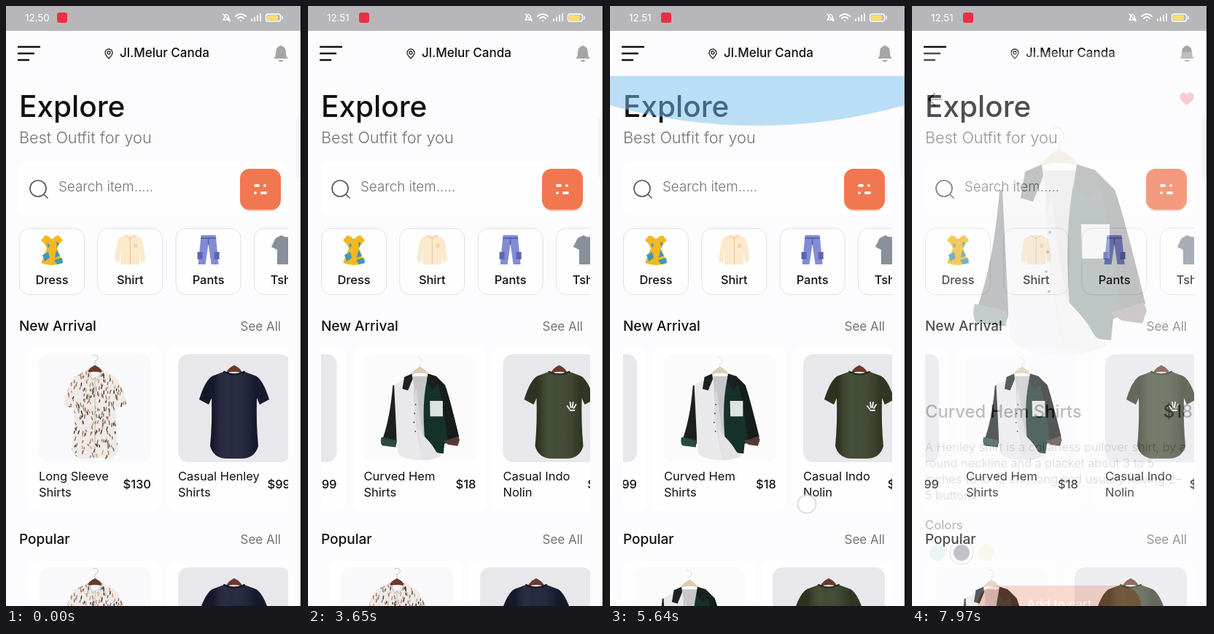
An HTML page for the animation above (8 s loop, 406 by 822 pixels).

```html
<!DOCTYPE html>
<html lang="en">
<head>
<meta charset="utf-8">
<title>Outfit shop</title>
<style>
html, body { margin: 0; width: 100%; height: 100%; overflow: hidden; background: #fcfcfe; }
svg { display: block; width: 100vw; height: 100vh; }
text { font-family: Inter, "Open Sans", sans-serif; fill: #111114; }
.medium { font-weight: 500; }
.light { font-weight: 300; }
.soft { fill: #737378; }
.end { text-anchor: end; }
.mid { text-anchor: middle; }
.line { fill: none; stroke-linecap: round; stroke-linejoin: round; }

.anim { animation: 8s linear infinite; }
#before { animation-name: hide; }
#after { animation-name: show; }
#page { animation-name: page; }
#cats { animation-name: cats; }
#arrivals { animation-name: arrivals; }
#popular { animation-name: popular; }
#glow { animation-name: glow; transform-origin: 202px 96px; }
#detail { animation-name: detail; }

@keyframes hide { 0% { opacity: 1; animation-timing-function: step-end; } 6.25%, 100% { opacity: 0; } }
@keyframes show { 0% { opacity: 0; animation-timing-function: step-end; } 6.25%, 100% { opacity: 1; } }
@keyframes cats {
  0%, 13.5% { transform: none; }
  14.25% { transform: translateX(-11px); animation-timing-function: ease-out; }
  15.75%, 22.5% { transform: translateX(-42px); animation-timing-function: ease-out; }
  25%, 100% { transform: none; }
}
@keyframes arrivals {
  0%, 37% { transform: none; animation-timing-function: ease-out; }
  40%, 42% { transform: translateX(-175px); animation-timing-function: ease-out; }
  46%, 100% { transform: translateX(-353px); }
}
@keyframes page {
  0%, 48% { transform: none; animation-timing-function: ease-out; }
  52%, 65.25% { transform: translateY(-174px); animation-timing-function: ease-out; }
  68.5%, 100% { transform: none; }
}
@keyframes popular {
  0%, 55.25% { transform: none; }
  56.75% { transform: translateX(-85px); }
  58.5% { transform: translateX(-200px); animation-timing-function: ease-out; }
  63%, 100% { transform: translateX(-395px); }
}
@keyframes glow {
  0%, 68.5% { transform: scaleY(.2); opacity: 0; animation-timing-function: ease-out; }
  70.5%, 71.25% { transform: none; opacity: .5; }
  73.75%, 100% { transform: scaleY(.3); opacity: 0; }
}
/* The page fades upwards on entry and drops back on exit. */
@keyframes detail {
  0% { visibility: hidden; opacity: 0; transform: translateY(205px); }
  77.5% { visibility: visible; opacity: 0; transform: translateY(205px); animation-timing-function: cubic-bezier(.4, 0, .2, 1); }
  80.6% { opacity: .8; transform: translateY(2px); }
  81.25%, 97.54% { opacity: 1; transform: none; }
  98.38% { opacity: .655; transform: translateY(9px); }
  99% { opacity: .445; transform: translateY(25px); }
  99.63% { opacity: .27; transform: translateY(62px); }
  100% { visibility: visible; opacity: .16; transform: translateY(106px); }
}
</style>
</head>
<body>
<svg viewBox="0 0 406 822" preserveAspectRatio="none" id="stage">
  <defs>
    <clipPath id="body"><rect y="96" width="404" height="726"/></clipPath>
    <clipPath id="list"><rect x="18" y="-20" width="369" height="300"/></clipPath>
    <path id="tee" d="M-14 24Q0 31 14 24L30 30Q40 36 48 62L35 69L31 60Q30 95 33 126Q28 143 10 143H-10Q-28 143 -33 126Q-30 95 -31 60L-35 69L-48 62Q-40 36 -30 30Z"/>
    <path id="blouse" d="M-11 22L0 32L11 22L28 31Q36 40 43 68Q37 74 29 73Q27 100 32 130Q27 145 12 143Q0 140 -12 143Q-27 145 -32 130Q-27 100 -29 73Q-37 74 -43 68Q-36 40 -28 31Z"/>
    <clipPath id="blouseClip"><use href="#blouse"/></clipPath>
    <clipPath id="catList"><rect x="18" y="300" width="369" height="100"/></clipPath>
    <linearGradient id="fold">
      <stop offset=".2" stop-color="#000" stop-opacity=".22"/>
      <stop offset=".45" stop-color="#fff" stop-opacity=".05"/>
      <stop offset=".8" stop-color="#000" stop-opacity=".18"/>
    </linearGradient>
    <path id="hanger" d="M-11 26Q-10 20 0 15Q10 20 11 26Q0 22 -11 26Z" fill="#6b3a2c"/>
    <g id="print">
      <path d="M0 15V9q5-1 4-5t-7-2" class="line" stroke="#c9c4bc" stroke-width="1"/>
      <use href="#hanger"/>
      <use href="#blouse" fill="#efeae5"/>
      <g id="specks" clip-path="url(#blouseClip)"></g>
      <path d="M-11 22L-3 36L0 32V141M11 22L3 36L0 32" class="line" stroke="#b5ada4" stroke-width=".8"/>
    </g>
    <g id="dark">
      <use href="#hanger"/>
      <use href="#tee" fill="#1b1f36"/><use href="#tee" fill="url(#fold)"/>
      <path d="M-14 24Q0 31 14 24" class="line" stroke="#0f1122" stroke-width="2"/>
    </g>
    <g id="olive">
      <use href="#hanger"/>
      <use href="#tee" fill="#39432a"/><use href="#tee" fill="url(#fold)"/>
      <path d="M-14 24Q0 31 14 24" class="line" stroke="#222a18" stroke-width="2"/>
      <path d="M14 75l-3-4M16 73l-1-7M18 73l1-7M20 74l3-5M15 77h6" class="line" stroke="#f4f4f4" stroke-width="1.8"/>
    </g>
    <g id="duo">
      <path d="M0 32V21q8 1 6-10T-8 2" class="line" stroke="#e4e0d4" stroke-width="2"/>
      <path d="M-27 54Q-18 40 0 31Q18 40 27 54Q0 46 -27 54Z" fill="#dccdb0"/>
      <path d="M-22 60H24L14 285H-10Z" fill="#c6c6cb"/>
      <path d="M-82 88Q-75 84 -68 98L-70 260L-74 270L-116 258Q-90 190 -82 88Z" fill="#1b201f"/>
      <path d="M-116 243L-72 253L-73 274L-114 269Q-121 258 -116 243Z" fill="#2c4a40"/>
      <path d="M-78 86L-48 70L-24 57Q-14 90 -20 150Q-8 220 8 312Q-30 315 -58 300L-67 290L-70 250Z" fill="#e9e9eb"/>
      <path d="M-10 95Q-2 190 12 240L30 312H8Q-18 200 -18 120Z" fill="#d9d9dd"/>
      <path d="M-24 52L-47 62L-53 98L-36 103L-22 68Z" fill="#1d2221"/>
      <path d="M25 52L51 62L76 87Q88 120 118 243L74 264L71 293L50 291Q42 270 14 242Q6 140 21 72Z" fill="#16302a"/>
      <path d="M51 62L76 87Q88 120 118 243L84 260Q78 180 51 62Z" fill="#171c1c"/>
      <path d="M24 52L50 60L56 84L38 100L21 74Z" fill="#1a201f"/>
      <path d="M70 256L116 241L120 252L114 270L86 266Z" fill="#553a34"/>
      <path d="M30 134H69V181H31Z" fill="#dfe3e0"/>
      <path d="M8 312Q30 316 66 300L50 288L14 242L-8 215Z" fill="#e3e3e6"/>
      <path d="M-13 145v.1M-16 172v.1M-18 199v.1M-14 226v.1" class="line" stroke="#3c3c40" stroke-width="4"/>
    </g>
    <use id="smallDuo" href="#duo" transform="translate(0 3) scale(.4545)"/>

    <g id="dress">
      <path d="M-9-20L-4-18Q0-12 4-18L9-20L15-13L10-8L7-2L15 18Q0 24 -15 18L-7-2L-10-8L-15-13Z" fill="#f3b822"/>
      <path d="M-13 7l8-4 2 8-7 5zM6 0l5 8-7 3zM3 14l11-3 1 7-8 2zM-7-9l4 2-2 5zM6-11l4 2-3 6z" fill="#3f97b8"/>
    </g>
    <g id="shirt">
      <path d="M-7-20H7L15-16Q19-8 21 15L15 18L13 2V20H-13V2L-15 18L-21 15Q-19-8 -15-16Z" fill="#fbe9cc"/>
      <path d="M0-17V20M-7-20L0-15L7-20" class="line" stroke="#e8c49a" stroke-width="1"/>
      <path d="M5-8h5v5H5z" fill="#f5d0b0"/>
    </g>
    <g id="pants">
      <path d="M-10-20H10L14 20H4L0-8L-4 20H-14Z" fill="#828cd6"/>
      <path d="M-15 3h7v10h-7zM8 3h7v10H8z" fill="#5a65b4"/>
      <path d="M-10-16H10M0-16V-8" class="line" stroke="#4f59a6" stroke-width="1.5"/>
    </g>
    <path id="tshirt" d="M-7-20Q0-15 7-20L15-16L21-4L13 0V20H-13V0L-21-4L-15-16Z" fill="#89909c"/>
    <path id="heart" d="M0 9Q-14-1 -8-7Q-3-11 0-5Q3-11 8-7Q14-1 0 9Z" fill="#ef4a5c"/>
  </defs>

  <rect width="406" height="822" fill="#fcfcfe"/>

  <g clip-path="url(#body)">
    <g id="page" class="anim">
      <text x="18" y="152" font-size="40.5" class="medium">Explore</text>
      <text x="18" y="188" font-size="21.7" class="light soft">Best Outfit for you</text>
      <rect x="18" y="213" width="369" height="74" rx="10" fill="#fefefe"/>
      <path d="M55 250a11 11 0 1 1-22 0a11 11 0 1 1 22 0M52 258l5 5" class="line" stroke="#5a5a5e" stroke-width="1.7"/>
      <text x="72" y="254" font-size="18.8" class="light soft">Search item.....</text>
      <rect x="322" y="227" width="54" height="54" rx="13" fill="#f0cdc0"/>
      <rect x="321" y="223" width="56" height="56" rx="13" fill="#f17750"/>
      <path d="M342 246h4M355 246v.1M342 256v.1M351 256h5" class="line" stroke="#fff4ee" stroke-width="4"/>

      <g clip-path="url(#catList)"><g id="cats" class="anim"></g></g>
      <g id="sections"></g>
    </g>
    <path id="glow" class="anim" d="M0 96H404V136Q202 192 0 136Z" fill="#78c0ee"/>
  </g>

  <g id="header">
    <path d="M17 56H46M17 65H38M17 74H31" class="line" stroke="#111114" stroke-width="2.4"/>
    <path d="M141 72Q136 67 136 64a5 5 0 0 1 10 0Q146 67 141 72ZM143 64a2 2 0 1 1-4 0a2 2 0 1 1 4 0" class="line" stroke="#303034" stroke-width="1.4"/>
    <text x="156" y="70" font-size="17" class="medium">Jl.Melur Canda</text>
    <path d="M367 72Q370 70 370 64Q370 56 377 54Q384 56 384 64Q384 70 387 72ZM373 74h8q-4 5-8 0Z" fill="#a5a5a8"/>
  </g>

  <g id="detail" class="anim">
    <rect width="404" height="822" fill="#fbfcfe"/>
    <path d="M41 65H23M31 57L23 65L31 73" class="line" stroke="#111114" stroke-width="2.2"/>
    <use href="#heart" x="377" y="64"/>
    <use href="#duo" x="202" y="102"/>
    <text x="18" y="501" font-size="23.8" class="medium">Curved Hem Shirts</text>
    <text x="385" y="501" font-size="23.8" class="medium end">$18</text>
    <g id="blurb"></g>
    <text x="18" y="654" font-size="16.6" class="medium">Colors</text>
    <circle cx="35" cy="686" r="11" fill="#b5e3dc"/>
    <circle cx="68" cy="686" r="16" fill="#fbfcfe" stroke="#c4a69c" stroke-width="1.5"/>
    <circle cx="68" cy="686" r="11" fill="#1b1f42"/>
    <circle cx="102" cy="686" r="11" fill="#f3e6c2"/>
    <rect x="92" y="735" width="220" height="54" rx="27" fill="#f0cdc0"/>
    <rect x="90" y="731" width="224" height="54" rx="27" fill="#f17750"/>
    <text x="202" y="763" font-size="16.8" class="medium mid" style="fill:#fff4ee">Add to cart</text>
  </g>

  <rect x="398" y="153" width="6" height="82" rx="3" fill="#f5f5f8"/>
  <rect width="406" height="34" fill="#b7b7b9"/>
  <g font-size="13.4">
    <text id="before" class="anim" x="26" y="21" style="fill:#fff">12.50</text>
    <text id="after" class="anim" x="26" y="21" style="fill:#fff">12.51</text>
  </g>
  <rect x="70" y="9" width="14" height="14" rx="3" fill="#ea2f45"/>
  <g class="line" stroke="#fff" stroke-width="1.4">
    <path d="M298 19Q300 17 300 14Q302 9 305 14Q305 17 307 19ZM298 11L307 21"/>
    <path d="M315 14Q322 8 329 14M318 17Q322 13 326 17M322 20v.1" stroke-width="2"/>
    <path d="M337 20v-2M341 20v-4M345 20v-7M349 20v-9" stroke-width="2"/>
    <rect x="356.5" y="11" width="20" height="10" rx="3"/>
    <path d="M379 14v4"/>
  </g>
  <rect x="358" y="12.5" width="15" height="7" rx="1.5" fill="#ffdf6a"/>
  <g id="touches"></g>
  <rect x="404" width="2" height="822" fill="#0a0a0c"/>
</svg>

<script>
const LOOP = 8000;
const byId = id => document.getElementById(id);

const products = [
  ['print', 'Long Sleeve', 'Shirts', '$130', '#f9f9fb'],
  ['dark', 'Casual Henley', 'Shirts', '$99', '#e8e8ec'],
  ['smallDuo', 'Curved Hem', 'Shirts', '$18', '#fbfbfc'],
  ['olive', 'Casual Indo', 'Nolin', '$120', '#e8e8ec']
];

const productCard = ([art, top, bottom, price, tint], i) => `
  <g transform="translate(${45 + 191 * i} 0)">
    <rect x="-15" y="-9" width="182" height="224" rx="12" fill="#fefefe"/>
    <rect width="154" height="148" rx="14" fill="${tint}"/>
    <use href="#${art}" x="77"/>
    <g font-size="16.5">
      <text y="173">${top}</text><text y="195">${bottom}</text>
      <text x="154" y="184" class="medium end">${price}</text>
    </g>
  </g>`;

const section = (title, id, y) => `
  <g transform="translate(0 ${y})">
    <text x="18" y="-32" font-size="19" class="medium">${title}</text>
    <text x="377" y="-32" font-size="17" class="soft end">See All</text>
    <g clip-path="url(#list)"><g id="${id}" class="anim">${products.map(productCard).join('')}</g></g>
  </g>`;

byId('sections').innerHTML = section('New Arrival', 'arrivals', 477) + section('Popular', 'popular', 769);

byId('cats').innerHTML = ['Dress', 'Shirt', 'Pants', 'Tshirt'].map((name, i) => `
  <g transform="translate(${18 + 107.3 * i} 304)">
    <rect x=".5" y=".5" width="89" height="91" rx="14" fill="#fefefe" stroke="#dfdfe4"/>
    <use href="#${name.toLowerCase()}" x="45" y="30"/>
    <text x="45" y="77" font-size="16.4" class="medium mid">${name}</text>
  </g>`).join('');

byId('blurb').innerHTML = [
  'A Henley shirt is a collarless pullover shirt, by a',
  'round neckline and a placket about 3 to 5',
  'inches (8 to 13 cm) long and usually having 2–',
  '5 buttons'
].map((row, i) => `<text x="18" y="${547 + 22 * i}" font-size="16.4" class="light soft">${row}</text>`).join('');

let seed = 48271;
const random = () => (seed = seed * 16807 % 2147483647) / 2147483647;
const inks = ['#2f2e35', '#8d6a58', '#c49a72', '#66707f', '#a5766a'];
byId('specks').innerHTML = Array.from({ length: 300 }, (_, i) => {
  const x = random() * 88 - 44, y = 24 + random() * 120;
  return `<path d="M${x} ${y}l${random() * 3 - 1.5} ${2 + random() * 3}" class="line" stroke="${inks[i % 5]}" stroke-width="1.4"/>`;
}).join('');

// Each swipe: start ms, end ms, from x, y, to x, y
const swipes = [
  [1060, 1400, 323, 373, 247, 373],
  [1760, 2060, 230, 373, 320, 373],
  [2930, 3160, 320, 560, 120, 560],
  [3330, 3560, 320, 560, 120, 560],
  [3800, 4120, 270, 650, 270, 470],
  [4400, 4700, 225, 691, 81, 691],
  [5200, 5720, 270, 450, 270, 724],
  [6110, 6180, 150, 560, 150, 560],
  [7720, 7790, 30, 64, 30, 64]
];
for (const [start, end, x0, y0, x1, y1] of swipes) {
  const ring = document.createElementNS('http://www.w3.org/2000/svg', 'circle');
  ring.setAttribute('r', 12.5);
  ring.setAttribute('fill', 'rgba(255,255,255,.6)');
  ring.setAttribute('stroke', '#d2d2d6');
  ring.setAttribute('stroke-width', 1.5);
  byId('touches').append(ring);
  const pose = (time, x, y, opacity) => ({ offset: time / LOOP, transform: `translate(${x}px, ${y}px)`, opacity });
  ring.animate([
    pose(0, x0, y0, 0), pose(start, x0, y0, 0), pose(start, x0, y0, 1),
    pose(end, x1, y1, 1), pose(end, x1, y1, 0), pose(LOOP, x1, y1, 0)
  ], { duration: LOOP, iterations: Infinity });
}
</script>
</body>
</html>
```
